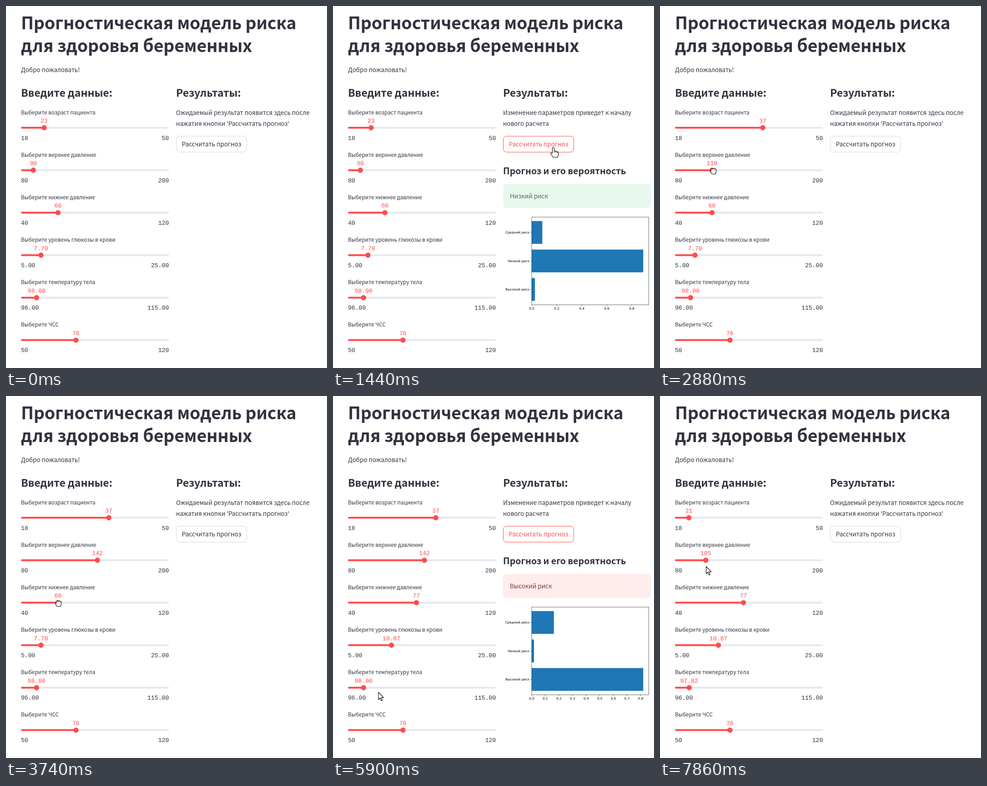
These frames come from a looping animation (706 by 794 pixels, 8000 ms). An HTML page:

```html
<!DOCTYPE html>
<html lang="ru">
<head>
<meta charset="utf-8">
<title>Прогностическая модель</title>
<style>
  html, body { margin: 0; width: 100%; height: 100%; overflow: hidden; background: #fff; }
  svg { display: block; width: 100%; height: 100%; }
  text { font-family: "Noto Sans CJK JP", "Noto Sans CJK SC", "Noto Sans", sans-serif; font-size: 13.48px; fill: #31333f; }
  .title { font-size: 37.5px; font-weight: 700; letter-spacing: -.005em; }
  .head { font-size: 23.1px; font-weight: 600; letter-spacing: -.005em; }
  .subhead { font-size: 19.8px; font-weight: 600; letter-spacing: -.005em; }
  .label { font-size: 11.83px; }
  .mono { font-family: "Liberation Mono", monospace; font-size: 13.125px; }
  .value { fill: #ff4b4b; text-anchor: middle; }
  .end { text-anchor: end; }
  .tick { font-family: "DejaVu Sans", sans-serif; font-size: 7.22px; fill: #000; }
  .mid { text-anchor: middle; }
  .axis { fill: none; stroke: #000; stroke-width: .6; }
  #cursor path { fill: #fff; stroke: #000; stroke-width: 1.1; stroke-linejoin: round; }
  #cursor .line { fill: none; stroke-width: .9; }
</style>
</head>
<body>
<svg id="stage" viewBox="0 0 706 794"></svg>
<script>
const LOOP = 8000, LEFT = 33, WIDTH = 325.3;

// Every track is a list of [time, value]; the value rests outside its keys.
const sliders = [
  { label: 'Выберите возраст пациента', min: 18, max: 50, digits: 0,
    keys: [[0, 23], [1960, 23], [2320, 37], [7120, 37], [7360, 21]] },
  { label: 'Выберите верхнее давление', min: 80, max: 200, digits: 0,
    keys: [[0, 90], [2780, 90], [2880, 110], [2960, 121], [3120, 121], [3260, 142], [7560, 142], [7740, 105]] },
  { label: 'Выберите нижнее давление', min: 40, max: 120, digits: 0,
    keys: [[0, 60], [3860, 60], [4180, 77]] },
  { label: 'Выберите уровень глюкозы в крови', min: 5, max: 25, digits: 2,
    keys: [[0, 7.7], [4600, 7.7], [4740, 10.47], [4800, 10.87]] },
  { label: 'Выберите температуру тела', min: 96, max: 115, digits: 2,
    keys: [[0, 98], [6100, 98], [6300, 99.3], [6560, 99.3], [6700, 97.82]] },
  { label: 'Выберите ЧСС', min: 50, max: 120, digits: 0, keys: [[0, 76]] }
];

// Pointer path: [time, x, y, shape from this time on]
const pointer = [
  [80, 658, 741, 'arrow'], [500, 78, 262, 'arrow'], [620, 78, 262, 'arrow'], [860, 141, 300, 'arrow'],
  [940, 378, 306, 'hand'], [1000, 484.5, 310, 'hand'], [1580, 484.5, 310, 'hand'],
  [1660, 390, 300, 'arrow'], [1900, 85, 268, 'fist'], [1960, 86, 268, 'fist'], [2320, 228, 268, 'fist'],
  [2440, 228, 268, 'arrow'], [2740, 62, 362, 'fist'], [2780, 62, 362, 'fist'], [2880, 117, 362, 'fist'],
  [2960, 147, 362, 'fist'], [3120, 147, 362, 'fist'], [3260, 203, 362, 'fist'],
  [3440, 203, 362, 'arrow'], [3720, 115, 455, 'fist'], [3860, 115, 455, 'fist'], [4180, 185, 455, 'fist'],
  [4320, 185, 455, 'arrow'], [4560, 79, 546, 'fist'], [4600, 79, 546, 'fist'], [4740, 123.5, 546, 'fist'],
  [4800, 130, 546, 'fist'], [4850, 130, 546, 'arrow'], [5000, 430, 318, 'hand'], [5060, 484.5, 310, 'hand'],
  [5740, 484.5, 310, 'hand'], [5780, 400, 390, 'arrow'], [5900, 100, 650, 'arrow'], [5980, 69, 641, 'fist'],
  [6100, 69, 641, 'fist'], [6300, 92, 641, 'fist'], [6560, 92, 641, 'fist'], [6700, 66, 641, 'fist'],
  [6740, 66, 649, 'arrow'], [7020, 223.5, 273, 'arrow'], [7080, 227, 268, 'fist'], [7120, 227, 268, 'fist'],
  [7360, 65, 268, 'fist'], [7400, 65, 268, 'arrow'], [7540, 203, 362, 'fist'], [7560, 203, 362, 'fist'],
  [7740, 102, 362, 'fist'], [7770, 102, 363, 'arrow'], [7860, 101.5, 374, 'arrow']
];

const results = [
  { from: 1240, to: 2400, name: 'Низкий риск', back: '#e8f8ee', ink: '#44704f',
    bars: [.085, .8915, .026], step: .2 },
  { from: 5300, to: 6440, name: 'Высокий риск', back: '#ffecec', ink: '#7d353b',
    bars: [.163, .017, .8195], step: .1 }
];
const buttonActive = [[940, 1960], [4980, 6100]];

const text = (x, y, str, cls = '', extra = '') => `<text x="${x}" y="${y}" class="${cls}" ${extra}>${str}</text>`;
const box = (x, y, w, h, fill, extra = '') =>
  `<rect x="${x}" y="${y}" width="${w}" height="${h}" fill="${fill}" ${extra}/>`;
const id = name => document.getElementById(name);
const within = (t, [from, to]) => t >= from && t < to;
const show = (el, on) => el.setAttribute('visibility', on ? 'visible' : 'hidden');

function sliderMarkup(s, i) {
  const y = 267 + 93.17 * i;
  return text(LEFT, y - 29.5, s.label, 'label')
    + box(LEFT, y - 2, WIDTH, 4, '#e5e8f0', 'rx="2"')
    + box(LEFT, y - 2, 0, 4, '#ff4b4b', `rx="2" id="fill${i}"`)
    + `<circle id="knob${i}" cy="${y}" r="5.7" fill="#ff4b4b"/>`
    + text(0, y - 11, '', 'mono value', `id="value${i}"`)
    + text(LEFT, y + 26.5, s.min.toFixed(s.digits), 'mono')
    + text(LEFT + WIDTH, y + 26.5, s.max.toFixed(s.digits), 'mono end');
}

function resultMarkup(r, i) {
  const x0 = 437, top = 463, w = 257.6, h = 192.4, unit = h / 3.08;
  const scale = w / 1.05 / Math.max(...r.bars);
  let chart = '', ticks = '';
  ['Средний риск', 'Низкий риск', 'Высокий риск'].forEach((name, k) => {
    const cy = top + unit * (.54 + k);
    chart += box(x0, cy - unit * .4, r.bars[k] * scale, unit * .8, '#1f77b4')
      + text(x0 - 5, cy + 2.4, name, 'tick end');
    ticks += `M${x0} ${cy}h-2.5`;
  });
  for (let v = 0; v < .85; v += r.step) {
    const x = x0 + v * scale;
    chart += text(x, 666, v.toFixed(1), 'tick mid');
    ticks += `M${x} ${top + h}v2.5`;
  }
  return `<g id="result${i}">`
    + text(374, 368.5, 'Прогноз и его вероятность', 'subhead')
    + box(374, 390, 325, 52.7, r.back, 'rx="7.5"')
    + text(389, 422, r.name, '', `style="fill:${r.ink}"`)
    + chart + `<path class="axis" d="${ticks}M${x0} ${top}h${w}v${h}h${-w}z"/></g>`;
}

const shapes = {
  arrow: '<path d="M0 0v16l3.7-3.5 2.6 6 2.4-1-2.6-5.9h5.2z"/>',
  hand: '<path d="M-2 12V2a2 2 0 0 1 4 0v6.5a2 2 0 0 1 3.5 .7a2 2 0 0 1 3.3 1a1.9 1.9 0 0 1 2.5 1.8v4.5l-2 5.5h-9.5l-5.3-7.5c-1-1.8 .8-3.4 2.5-1.5z"/>'
    + '<path class="line" d="M2 8v4M5.5 9.2v3M8.8 10.2v2.5"/>',
  fist: '<path d="M-4.5-1.5V-4a1.7 1.7 0 0 1 3-1a1.7 1.7 0 0 1 3 .2a1.7 1.7 0 0 1 3 .6a1.5 1.5 0 0 1 2 1.5V1.5L4.8 6.5H-3L-6.2 1.5c-.6-1.5 .2-2.6 1.7-3z"/>'
    + '<path class="line" d="M-4.5-1.5V1M-1.5-5v2M1.5-4.8v2M4.5-4.2v2"/>'
};

id('stage').innerHTML =
  text(33, 51, 'Прогностическая модель риска', 'title')
  + text(33, 101, 'для здоровья беременных', 'title')
  + text(33, 145, 'Добро пожаловать!')
  + text(33, 199, 'Введите данные:', 'head')
  + text(374, 199, 'Результаты:', 'head')
  + sliders.map(sliderMarkup).join('')
  + `<g id="before">${text(374, 238.5, 'Ожидаемый результат появится здесь после')
    + text(374, 262.5, "нажатия кнопки 'Рассчитать прогноз'")}</g>`
  + `<g id="after">${text(374, 238.5, 'Изменение параметров приведет к началу')
    + text(374, 262.5, 'нового расчета')}</g>`
  + box(374.5, 285.5, 155, 35, '#fff', 'rx="7.5" id="button"')
  + text(452, 307.8, 'Рассчитать прогноз', 'mid', 'id="caption"')
  + results.map(resultMarkup).join('')
  + '<g id="cursor">' + Object.keys(shapes).map(k => `<g id="${k}">${shapes[k]}</g>`).join('') + '</g>';

// The key before t, and a reader for eased values towards the next key
function segment(keys, t) {
  let i = 0;
  while (i < keys.length - 1 && t >= keys[i + 1][0]) i++;
  const a = keys[i], b = keys[i + 1] || a;
  const u = b === a ? 0 : Math.max(0, (t - a[0]) / (b[0] - a[0]));
  const e = u * u * (3 - 2 * u);
  return { a, at: n => a[n] + (b[n] - a[n]) * e };
}

function draw(t) {
  sliders.forEach((s, i) => {
    const value = segment(s.keys, t).at(1).toFixed(s.digits);
    const offset = (value - s.min) / (s.max - s.min) * WIDTH;
    id('fill' + i).setAttribute('width', offset);
    id('knob' + i).setAttribute('cx', LEFT + offset);
    id('value' + i).setAttribute('x', LEFT + offset);
    id('value' + i).textContent = value;
  });

  const shown = results.map(r => within(t, [r.from, r.to]));
  shown.forEach((on, i) => show(id('result' + i), on));
  show(id('after'), shown.includes(true));
  show(id('before'), !shown.includes(true));

  const active = buttonActive.some(span => within(t, span));
  id('button').setAttribute('stroke', active ? '#ff4b4b' : '#d6d6d9');
  id('caption').style.fill = active ? '#ff4b4b' : '#31333f';

  const p = segment(pointer, t);
  id('cursor').setAttribute('transform', `translate(${p.at(1)} ${p.at(2)})`);
  for (const k in shapes) show(id(k), t >= pointer[0][0] && p.a[3] === k);
}

const start = performance.now();
function frame() {
  draw((performance.now() - start) % LOOP);
  requestAnimationFrame(frame);
}
frame();
</script>
</body>
</html>
```
